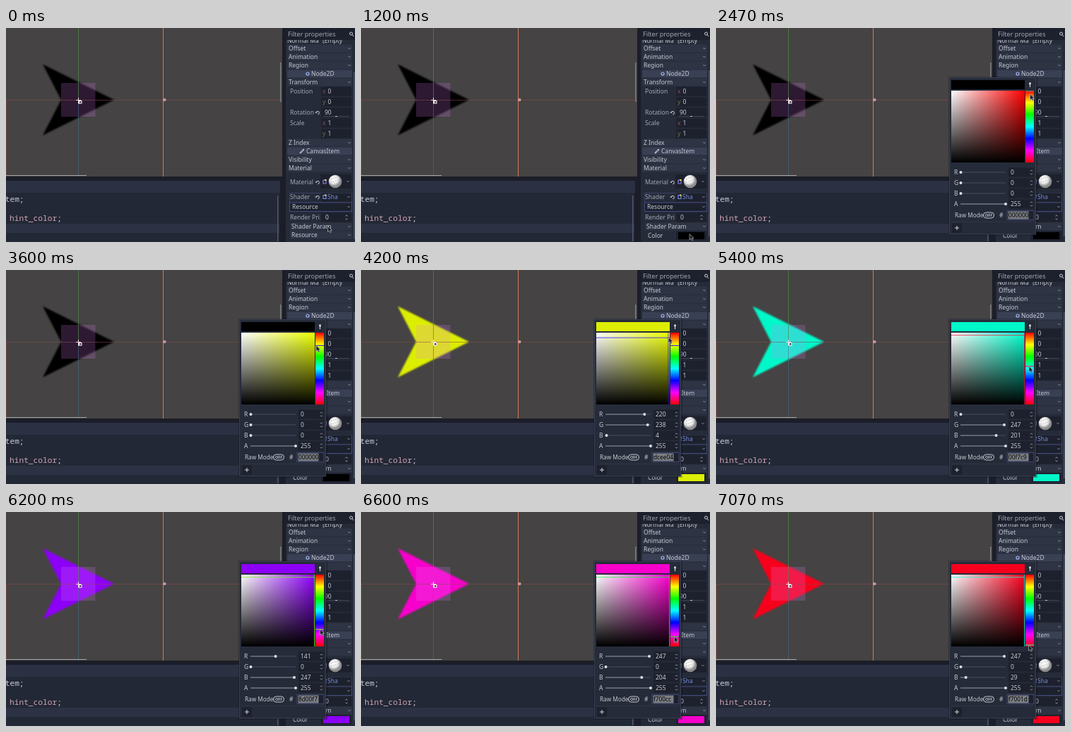
An HTML page for the animation above (7130 ms loop, 494 px wide and 304 px high).

```html
<!DOCTYPE html>
<html lang="en">
<head>
<meta charset="utf-8">
<title>Shader colour picker</title>
<style>
  html, body { margin: 0; width: 100%; height: 100%; overflow: hidden; background: #262b39; }
  svg { display: block; width: 494px; height: 304px; }
  text { font: 8.5px "Noto Sans", "Open Sans", sans-serif; fill: #c5c9d2; white-space: pre; }
  .code { font: 11.2px "Noto Sans Mono", "DejaVu Sans Mono", monospace; }
</style>
</head>
<body>
<svg id="stage" viewBox="0 0 494 304" xmlns="http://www.w3.org/2000/svg"></svg>
<script>
const LOOP = 7130;
const FIELD = '#1d212d', HEAD = '#2e3444', PANEL = '#262b39', EDGE = '#1b1e28';
const SQUARE = { x: 333, y: 89, w: 104, h: 102 };
const HUE = { x: 438, y: 89, w: 12, h: 102 };
const EXPAND = 270, OPEN = 1400, PICK = [3870, 4270], HUE_DRAG = [2870, 3600, 4670];

// Pointer tip: time, x, y
const PATH = [
  [0, 455.5, 281.5], [530, 455.5, 281.5], [730, 457, 290], [870, 457.5, 292], [1000, 457.5, 292],
  [1330, 470, 293], [1400, 470, 293], [1730, 450, 262], [1800, 450, 262], [2470, 444.5, 94],
  [2530, 444.5, 94], [2730, 444, 92.5], [2870, 444, 92.5], [3530, 440, 107], [3600, 439, 107.3],
  [3870, 428, 112], [4270, 437, 92.2], [4330, 437, 92.2], [4600, 443, 101], [4930, 443, 104.56],
  [5130, 443, 115], [5400, 443, 136.83], [5800, 443, 151], [6200, 444.5, 166.7], [7070, 442.5, 189], [7130, 442.5, 189]
];

const rect = (x, y, w, h, fill, more = '') =>
  `<rect x="${x}" y="${y}" width="${w}" height="${h}" fill="${fill}" ${more}/>`;
const line = (d, color, width = 1, more = '') =>
  `<path d="${d}" fill="none" stroke="${color}" stroke-width="${width}" ${more}/>`;
const text = (x, y, s, more = '') => `<text x="${x}" y="${y + 3}" ${more}>${s}</text>`;
const chevron = (x, y) => line(`M${x - 1.6} ${y - .8}l1.6 1.6l1.6 -1.6`, '#9aa0ae', .9);
const spinner = (x, y) => line(`M${x - 1.5} ${y - 1.6}l1.5 -1.6l1.5 1.6M${x - 1.5} ${y + 1.6}l1.5 1.6l1.5 -1.6`, '#a4a9b6', .9);
const reset = (x, y) => line(`M${x - 2} ${y + .5}a2.2 2.2 0 1 1 2.2 2.2M${x - 3.3} ${y - .6}l1.3 1.5l1.3 -1.5`, '#d5d8df', .9);
const section = (y, s, x = 400) => rect(x - 2, y - 5.5, 490 - x + 2, 11, HEAD) + text(x, y, s) + chevron(486, y);
const category = (y, s, x) => rect(398, y - 5.5, 92, 11, '#394054') + text(x, y, s);
const field = (y, value, axis, color) =>
  rect(446, y - 6.5, 43, 13, FIELD) + text(448, y, axis, `style="fill:${color}"`) + text(455.5, y, value);

function viewport() {
  return rect(0, 0, 391, 211, '#454343')
    + '<path id="arrow" d="M52 51.5L153 102L52 152.5L78 102Z" filter="url(#soft)"/>'
    + rect(78, 78, 48.5, 48, '#e17dfa', 'opacity=".2"')
    + line('M0 102.5H391', '#8f4a50', 1, 'opacity=".55"')
    + line('M102.5 0V102', '#4f8a4a', 1, 'opacity=".7"')
    + line('M102.5 102V211', '#46718c', 1, 'opacity=".6"')
    + line('M.5 102V211', '#8c4a50', 1, 'opacity=".6"')
    + line('M222.5 0V211', '#cf7a55')
    + '<circle cx="224.5" cy="102" r="1.6" fill="#c77f8c" stroke="#e8ccd2" stroke-width=".8"/>'
    + line('M99 102.5H106M102.5 99V106', '#ecd3dc', 1.1)
    + rect(103.5, 103.5, 3.5, 3.5, '#4a4048', 'stroke="#fff"') + rect(102, 106, 2, 1.5, '#e8dfe6');
}

function viewportBars() {
  return rect(388, 49, 1.5, 56, '#7d7e83') + rect(0, 209, 114, 1, '#a3a6a6');
}

function codeEditor() {
  return rect(0, 211, 396, 93, EDGE) + rect(0, 217, 388, 17, '#2b3142')
    + rect(0, 234, 387, 70, '#232836') + rect(0, 278, 387, 13, '#2c3243')
    + '<text class="code" x="-1.3" y="247">tem;</text>'
    + '<text class="code" x="5" y="274"><tspan fill="#d0a4b2">hint_color</tspan>;</text>'
    + rect(384, 238, 1.5, 65, '#4f566c');
}

function inspector() {
  let out = rect(391, 0, 5, 304, EDGE) + rect(396, 0, 98, 304, PANEL)
    + text(398, 18, 'Normal Ma') + text(448, 18, '[Empty')
    + rect(396, 0, 98, 17, FIELD)
    + text(399, 9, 'Filter properties', 'style="font-size:9px;fill:#a0a6b3"')
    + '<circle cx="488.5" cy="8" r="2" fill="none" stroke="#d0d3da"/>' + line('M490 9.5l2 2.5', '#d0d3da');
  out += [[29, 'Offset'], [41, 'Animation'], [53, 'Region'], [77, 'Transform'],
    [163, 'Z Index'], [187, 'Visibility'], [199, 'Material']].map(r => section(...r)).join('');
  out += category(65, 'Node2D', 432) + '<circle cx="427" cy="65" r="2" fill="none" stroke="#a5b7f3" stroke-width="1.2"/>'
    + category(175, 'CanvasItem', 425) + line('M416 178l1 -2l4 -4l1 1l-4 4z', '#d9dce3', 1);
  out += [[90, 'Position'], [120, 'Rotation'], [135, 'Scale'], [219, 'Material'], [240, 'Shader'], [269, 'Render Pri']]
    .map(([y, s]) => text(402, y, s, 'style="fill:#a2a8b5"')).join('');
  for (const [y, v] of [[90, 0], [135, 1]])
    out += field(y, v, 'x', '#84505a') + field(y + 15, v, 'y', '#657a4a');
  out += reset(441, 120) + rect(446, 113.5, 43, 13, FIELD) + text(451, 120, '90')
    + rect(449, 125, 37, 1, '#3f4659') + rect(466, 125, 3, 1, '#c5c8cf');
  out += reset(441, 219) + rect(445, 208, 44, 20, FIELD) + line('M449 216h4v5h-4z', '#8f7ff0', 1.2) + rect(451, 215, 2.5, 2, '#e8d35c')
    + '<circle cx="466" cy="218" r="9.3" fill="url(#ball)"/>'
    + line('M460 215l11 -4M460 219l13 -4M462 223l11 -4', '#a5a5a5', .7, 'stroke-dasharray="1.5 1.5"') + chevron(484, 218);
  out += line('M401.5 261V234.5H489.5V261', '#394162') + reset(441, 240) + rect(446, 234.5, 43, 12, FIELD)
    + line('M449 237.5h4v5h-4z', '#7d8cf0', 1.2) + rect(451, 236.5, 2.5, 2, '#e8d35c')
    + text(455, 240, 'Sha', 'style="fill:#7590e0"') + chevron(485, 240)
    + rect(401.5, 248, 88, 12.5, FIELD, 'stroke="#434c80"') + text(405, 254, 'Resource') + chevron(485, 254);
  out += rect(446, 262.5, 43, 13, FIELD) + text(452, 269, '0') + spinner(482, 269);
  out += section(282, 'Shader Param', 404)
    + `<g id="collapsed">${section(294, 'Resource', 404)}${rect(492, 62, 1.5, 238, '#4f566c')}</g>`
    + `<g id="expanded">${text(406, 295, 'Color')}${rect(446, 288.5, 43, 13, FIELD)}`
    + `${rect(449, 290, 37, 10, '#000', 'id="swatch"')}${rect(492, 60, 1.5, 236, '#4f566c')}</g>`;
  return out;
}

function channel(name, i) {
  const y = 205 + i * 15;
  return text(337, y, name) + rect(346, y - .5, 64, 1, '#474e61')
    + rect(346, y - .5, 0, 1, '#858b9a', `id="track${name}"`)
    + `<circle id="knob${name}" cx="346" cy="${y}" r="2" fill="#dfe1e6"/>`
    + rect(414, y - 6.5, 36, 13, FIELD) + text(417, y, '0', `id="value${name}"`) + spinner(446.5, y);
}

function picker() {
  const { x, y, w, h } = SQUARE;
  return '<g id="picker">' + rect(329, 69, 126, 226, '#000', 'opacity=".25"')
    + rect(330.5, 70.5, 122, 222.5, PANEL, 'stroke="#394055"')
    + rect(333, 74, 104, 13, '#000', 'id="preview"')
    + line('M444.5 77.5V80.5', '#fff', 2.2) + line('M444.5 80.5V84', '#e0e2e8', 1.1)
    + rect(x, y, w, h, '#f00', 'id="pure"') + rect(x, y, w, h, 'url(#toWhite)') + rect(x, y, w, h, 'url(#toBlack)')
    + '<path id="cross" fill="none" opacity=".75" clip-path="url(#inside)"/>'
    + rect(HUE.x, HUE.y, HUE.w, HUE.h, 'url(#rainbow)') + '<path id="hueMark" fill="none" clip-path="url(#inside)"/>'
    + [...'RGBA'].map(channel).join('')
    + text(338, 266, 'Raw Mode', 'style="font-size:8.2px"')
    + rect(378.5, 262, 15, 8, 'none', 'rx="4" stroke="#c5c9d2"')
    + text(381, 265.3, 'OFF', 'style="font-size:5.4px;font-weight:700"') + text(401, 266, '#')
    + rect(412, 259.5, 38, 13, FIELD, 'stroke="#454f80" stroke-width=".8"')
    + rect(413.5, 260.5, 29, 11, '#7d8086') + text(414, 266, '000000', 'id="hex" style="font-size:8.3px;fill:#000"')
    + line('M333 275.5H450', '#30364a') + rect(334, 277.5, 14, 13, FIELD)
    + line('M338 284H344M341 281V287', '#d5d8df') + '</g>';
}

const stops = list => list.map(([at, color, alpha = 1]) =>
  `<stop offset="${at}" stop-color="${color}" stop-opacity="${alpha}"/>`).join('');
const gradient = (id, down, list) =>
  `<linearGradient id="${id}" x2="${down ? 0 : 1}" y2="${down ? 1 : 0}">${stops(list)}</linearGradient>`;

document.getElementById('stage').innerHTML = '<defs>'
  + '<filter id="soft"><feGaussianBlur stdDeviation=".9"/></filter>'
  + `<clipPath id="inside">${rect(SQUARE.x, SQUARE.y, HUE.x + HUE.w - SQUARE.x, SQUARE.h, '#000')}</clipPath>`
  + gradient('toWhite', false, [[0, '#fff'], [1, '#fff', 0]])
  + gradient('toBlack', true, [[0, '#000', 0], [1, '#000']])
  + gradient('rainbow', true, ['#f00', '#ff0', '#0f0', '#0ff', '#00f', '#f0f', '#f00'].map((c, i) => [i / 6, c]))
  + `<radialGradient id="ball" cx=".4" cy=".35">${stops([[0, '#fff'], [.65, '#e8e8e8'], [1, '#8d8d8d']])}</radialGradient>`
  + '</defs>' + viewport() + codeEditor() + viewportBars() + inspector() + picker()
  + '<path id="pointer" d="M0 0V8.2L2 6.4L3.4 9.2L4.9 8.5L3.6 5.8H6Z" fill="#1a1c22" stroke="#b4b7be" stroke-width=".7"/>';

const el = id => document.getElementById(id);
const set = (id, attrs) => { for (const k in attrs) el(id).setAttribute(k, attrs[k]); };
const clamp = v => Math.min(1, Math.max(0, v));
const css = rgb => `rgb(${rgb})`;
const invert = rgb => rgb.map(c => 255 - c);

function pointerAt(t) {
  const i = Math.max(1, PATH.findIndex(p => p[0] >= t));
  const [a, b] = [PATH[i - 1], PATH[i]];
  const f = clamp((t - a[0]) / (b[0] - a[0]));
  return [a[1] + (b[1] - a[1]) * f, a[2] + (b[2] - a[2]) * f];
}

function hueAt(t) {
  const [start, end, again] = HUE_DRAG;
  if (t < start) return 0;
  const y = pointerAt(t >= again ? t : Math.min(t, end))[1];
  return clamp((y - HUE.y) / HUE.h) * 360;
}

function shadeAt(t) {
  if (t < PICK[0]) return [0, 0];
  const [x, y] = pointerAt(Math.min(t, PICK[1]));
  return [clamp((x - SQUARE.x) / SQUARE.w), clamp(1 - (y - SQUARE.y) / SQUARE.h)];
}

function hsv(h, s, v) {
  return [5, 3, 1].map(n => {
    const k = (n + h / 60) % 6;
    return Math.round(255 * v * (1 - s * clamp(Math.min(k, 4 - k))));
  });
}

function render(t) {
  const hue = hueAt(t), [s, v] = shadeAt(t);
  const rgb = hsv(hue, s, v), pure = hsv(hue, 1, 1), [px, py] = pointerAt(t);
  const show = (id, on) => set(id, { visibility: on ? 'visible' : 'hidden' });
  show('collapsed', t < EXPAND);
  show('expanded', t >= EXPAND);
  show('picker', t >= OPEN);
  for (const id of ['arrow', 'swatch', 'preview']) set(id, { fill: css(rgb) });
  set('pure', { fill: css(pure) });

  const { x, y, w, h } = SQUARE;
  const cx = x + s * w - .5, cy = y + (1 - v) * h + .5;
  set('cross', { d: `M${cx} ${y}v${h}M${x} ${cy}h${w}`, stroke: css(invert(rgb)) });
  set('hueMark', { d: `M${HUE.x} ${HUE.y + hue / 360 * HUE.h}h${HUE.w}`, stroke: css(invert(pure)) });

  [...rgb, 255].forEach((c, i) => {
    const name = 'RGBA'[i], offset = c / 255 * 63.5;
    set('track' + name, { width: offset });
    set('knob' + name, { cx: 346.5 + offset });
    el('value' + name).textContent = c;
  });
  el('hex').textContent = rgb.map(c => c.toString(16).padStart(2, '0')).join('');
  set('pointer', { transform: `translate(${px} ${py})` });
}

function tick(now) {
  const step = Math.floor((Math.max(0, now - start) % LOOP + 4) * 15 / 1000);
  render(Math.min(7070, Math.round(step * 20 / 3) * 10));
  requestAnimationFrame(tick);
}
const start = performance.now();
render(0);
requestAnimationFrame(tick);
</script>
</body>
</html>
```
